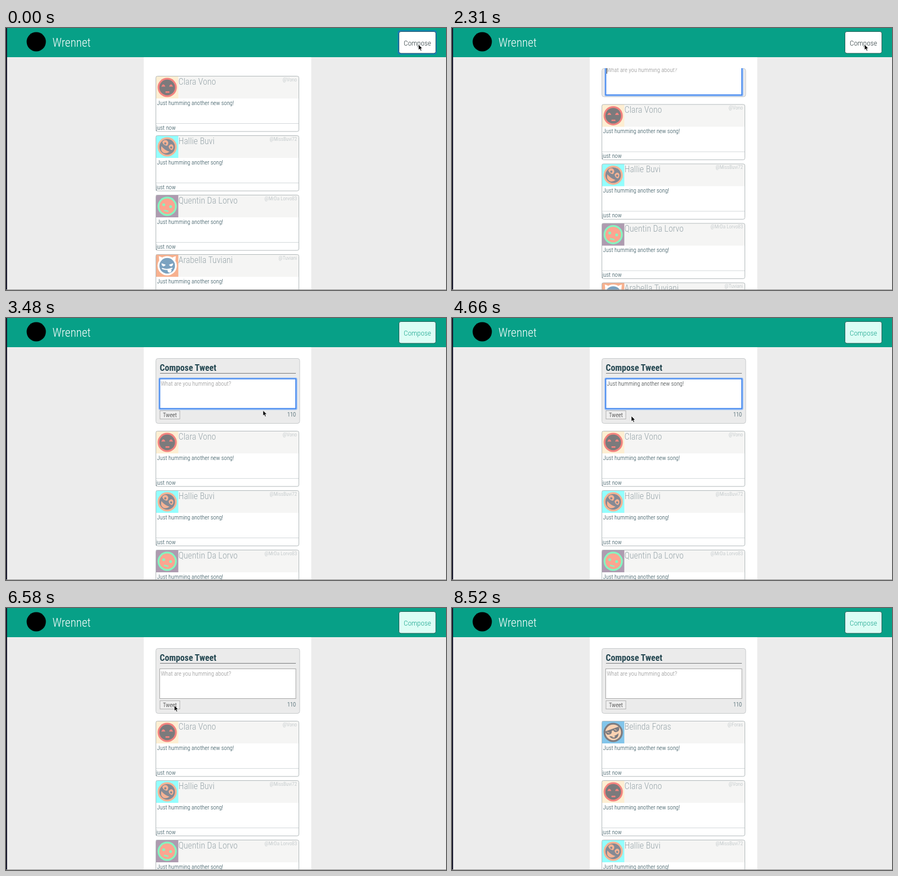
An HTML page that plays this animation: 800 by 476 pixels, repeating every 8.62 s.

```html
<!DOCTYPE html>
<html lang="en">
<head>
<meta charset="utf-8">
<title>Compose</title>
<style>
  html, body { margin: 0; width: 100%; height: 100%; overflow: hidden; background: #ececec; }
  svg { display: block; font: 300 10.8px "Roboto Condensed", Roboto, sans-serif; font-stretch: 75%; }
  text { fill: #244751; white-space: pre; }
  .name { font-size: 16.2px; fill: #99a6ab; }
  .handle { font-size: 9.45px; fill: #b3bbbe; text-anchor: end; }
  .title { font-size: 21.6px; fill: #fff; }
  .heading { font-size: 16.2px; font-weight: 700; }
  .end { text-anchor: end; }
  .mid { text-anchor: middle; }
</style>
</head>
<body>
<svg id="stage" width="800" height="476" viewBox="0 0 800 476"></svg>
<script>
const LOOP = 8620;
const PANEL_HEIGHT = 118;
const CARD_STEP = 108;
const POST_TIME = 6730;

// The screen only refreshes at these times.
const steps = [0, 2100, 2310, 2450, 2600, 2740, 2890, 3040, 3340, 3480, 3630, 3770, 4220, 4370, 4510,
  4660, 4800, 4950, 5090, 5240, 5690, 6140, 6580, 6730, 7020, 8220, 8520];

// Pointer path: time, x, y
const pointerPath = [
  [2600, 750, 30], [2740, 690, 66], [3040, 490, 160], [3340, 490, 160], [3770, 420, 184],
  [4220, 400, 184], [4660, 326, 178], [5240, 306, 177]
];

const disc = (x, y, r, fill) => `<circle cx="${x}" cy="${y}" r="${r}" fill="${fill}"/>`;
const path = (d, fill) => `<path d="${d}" fill="${fill}"/>`;
const line = (d, stroke, width) =>
  `<path d="${d}" fill="none" stroke="${stroke}" stroke-width="${width}" stroke-linecap="round"/>`;
const face = (bg, ring, skin, features) =>
  `<rect width="40.5" height="40.5" fill="${bg}"/>` +
  disc(20.3, 20.5, 17.5, ring) + disc(20.3, 20.5, 14.2, skin) + features;

const avatars = {
  shades: face('#82c5ea', '#7d7c80', '#fbd3b3',
    `<g transform="rotate(-20 20 20)">${
      path('M7 14H33V17Q32 22 27 22Q22 22 21.500 17H18.500Q18 22 13 22Q8 22 7 17Z', '#7d7c80') +
      line('M10 16.500L13 19M24 16.500L27 19', '#fbd3b3', 1)}</g>` +
    path('M13 27Q21 30 30 22Q30 31 22 32Q16 32 13 27Z', '#7d7c80') +
    path('M18 29L21 26.500L24 28L22 30Z', '#fbd3b3')),
  sleepy: face('#fdeed2', '#f3837f', '#7b7a7c',
    path('M9.500 19L12 15.200Q15.500 14.500 16.800 19ZM23.800 19Q25 14.500 28.500 15.200L31 19Z', '#f3837f') +
    '<rect x="17" y="27.600" width="7.500" height="2.600" rx="1.200" fill="#f3837f"/>'),
  grin: face('#93fefd', '#f5b294', '#858a94',
    `<g transform="rotate(35 20 20)">${
      path('M8 18Q8 11 14 11Q20 12 19 19Q13 22 8 18ZM22 18Q22 10 28 12Q32 15 31 20Q26 22 22 18Z', '#f5b294') +
      disc(14, 17, 2, '#858a94') + disc(27, 17, 2, '#858a94') +
      path('M11 25Q20 28 29 25Q26 33 20 33Q14 33 11 25Z', '#f5b294')}</g>`),
  calm: face('#ae9bb0', '#84f5c0', '#fca590',
    disc(14, 17.5, 2.6, '#84f5c0') + disc(26.5, 21, 2.6, '#84f5c0') +
    line('M15.500 28L21.500 29.500', '#84f5c0', 2.4)),
  imp: face('#f7b18f', '#fff', '#7ba2c0',
    path('M6 13L5 3Q10 4 13 7ZM35 13L36 3Q31 4 28 7Z', '#fff') +
    path('M10 16L17.500 18.500Q16 22 13 21.500Q10 20 10 16ZM31 16L23.500 18.500Q25 22 28 21.500Q31 20 31 16Z', '#fff') +
    line('M11.500 25.500Q20 29 29 25', '#fff', 2) +
    path('M21 27H28V30Q27 33 24.500 33Q22 33 21 30Z', '#fff'))
};

const hum = 'Just humming another song!';
const newHum = 'Just humming another new song!';
const posts = [
  ['Belinda Foras', '@Foras', newHum, 'shades'],
  ['Clara Vono', '@Vono', newHum, 'sleepy'],
  ['Hallie Buvi', '@MissBuvi72', hum, 'grin'],
  ['Quentin Da Lorvo', '@MrDa Lorvo83', hum, 'calm'],
  ['Arabella Tuviani', '@Tuviani', hum, 'imp']
];

const card = ([name, handle, message, avatar], i) => `
  <g id="card${i}" transform="translate(272 ${CARD_STEP * (i - 1)})">
    <rect x=".5" y=".5" width="260" height="100.500" rx="3" fill="#fff"/>
    <rect x="1" y="1" width="259.500" height="40" fill="#f5f5f4"/>
    <g transform="translate(.800 .500)">${avatars[avatar]}</g>
    <path d="M1 86.500H260" stroke="#d3d8da"/>
    <rect x=".5" y=".5" width="260" height="100.500" rx="3" fill="none" stroke="#b1b8ba"/>
    <text class="name" x="41.500" y="16">${name}</text>
    <text class="handle" x="257" y="10">${handle}</text>
    <text x="2.500" y="53">${message}</text>
    <text x="1" y="98">just now</text>
  </g>`;

const stage = document.getElementById('stage');
stage.innerHTML = `
  <defs><clipPath id="window"><rect id="windowBox" x="272" y="73" width="263" height="0"/></clipPath></defs>
  <rect width="800" height="476" fill="#ececec"/>
  <rect x="250.500" y="53" width="304.500" height="423" fill="#fff"/>
  <g id="feed">${posts.map(card).join('')}</g>
  <g id="panel">
    <rect id="panelBox" x="272.500" y="73.500" width="261.500" rx="4" fill="#ebebeb" stroke="#c6c9ca"/>
    <g clip-path="url(#window)"><g id="form">
      <text class="heading" x="279.500" y="96">Compose Tweet</text>
      <path d="M280 100.500H527" stroke="#77797b"/>
      <rect id="glow" x="279" y="110" width="249" height="55.500" rx="1.500" fill="none" stroke="#9dc1f5" stroke-width="3.500"/>
      <rect id="area" x="279.500" y="110.500" width="247.500" height="54" fill="#fff"/>
      <text id="entry" x="281.500" y="123"></text>
      <rect id="caret" y="113" width="1" height="13" fill="#333"/>
      <rect x="280" y="168.500" width="36" height="15" fill="#efefef" stroke="#b0b0b0"/>
      <text class="mid" x="298" y="180" style="fill:#222">Tweet</text>
      <text class="end" x="527" y="178.500">110</text>
    </g></g>
  </g>
  <rect width="800" height="53" fill="#07a087"/>
  <circle cx="55" cy="25" r="17.500" fill="#000"/>
  <text class="title" x="84.500" y="34">Wrennet</text>
  <rect id="ring" x="712.500" y="4.500" width="70.500" height="43.500" rx="4" fill="#1677c5"/>
  <rect id="button" x="714.500" y="6.500" width="67" height="39.500" rx="3.500" stroke="#245c55"/>
  <text id="label" class="mid" x="748" y="31.500" font-size="13.500">Compose</text>
  <rect width="2" height="476" fill="#15152a"/>
  <rect y="475" width="800" height="1" fill="#929292"/>
  <path id="pointer" d="M0 0V10L2.300 7.900L3.900 11.500L5.700 10.700L4.100 7.200H7.200Z" fill="#000" stroke="#fff" stroke-width=".8"/>`;

const el = id => document.getElementById(id);
const set = (id, attrs) => Object.entries(attrs).forEach(([key, value]) => el(id).setAttribute(key, value));
const show = (id, on) => set(id, { visibility: on ? 'inherit' : 'hidden' });
const between = (t, a, b) => t >= a && t < b;

// Tighten the spacing where no condensed face is available.
const pen = document.createElement('canvas').getContext('2d');
const measure = font => { pen.font = font; return pen.measureText(newHum).width; };
if (Math.abs(measure('300 condensed 20px "Roboto Condensed", Roboto, sans-serif') -
    measure('300 20px Roboto, sans-serif')) < 1) stage.style.letterSpacing = '-.055em';

function slide(t) {
  if (t < 2100) return 0;
  const x = Math.min(1, (t - 2053) / 560);
  return 0.5 - Math.cos(Math.PI * x) / 2;
}

function pointerAt(t) {
  const next = pointerPath.findIndex(p => p[0] > t);
  if (next === 0) return pointerPath[0].slice(1);
  if (next < 0) return pointerPath[pointerPath.length - 1].slice(1);
  const [t0, x0, y0] = pointerPath[next - 1];
  const [t1, x1, y1] = pointerPath[next];
  const k = (t - t0) / (t1 - t0);
  return [x0 + (x1 - x0) * k, y0 + (y1 - y0) * k];
}

function render(time) {
  const t = steps.filter(s => s <= time).pop();
  const p = slide(t);
  const height = PANEL_HEIGHT * p;
  const scroll = Math.min(39 + 7 * (1 - p), PANEL_HEIGHT - height);
  const posted = t >= POST_TIME;
  const focused = between(t, 2100, 6580);
  const filled = between(t, 3770, 6580);
  const hover = t < 2740;

  show('panel', p > 0);
  set('panelBox', { height });
  set('windowBox', { height: height + 0.5 });
  set('form', { transform: `translate(0 ${-scroll})` });
  set('feed', { transform: `translate(0 ${87 + height + (posted ? CARD_STEP : 0)})` });
  show('card0', posted);

  show('glow', focused);
  set('area', { stroke: focused ? '#3b82ee' : '#a5a5a5', 'stroke-width': focused ? 1.8 : 1 });
  el('entry').textContent = filled ? newHum : 'What are you humming about?';
  el('entry').style.fill = filled ? '#2f3436' : '#8b8b8b';
  const blink = filled
    ? between(t, 3770, 4220) || between(t, 4800, 5240) || between(t, 5690, 6140)
    : between(t, 2100, 2600) || between(t, 3040, 3480);
  show('caret', focused && blink);
  set('caret', { x: filled ? 422 : 281 });

  show('ring', t < 2100);
  set('button', { fill: hover ? '#fff' : '#dcfdf5' });
  el('label').style.fill = hover ? '#2b3a3d' : '#16a38c';
  show('pointer', t < 8220);
  set('pointer', { transform: `translate(${pointerAt(t)})` });
}

const start = performance.now();
function tick() {
  render((performance.now() - start) % LOOP);
  requestAnimationFrame(tick);
}
tick();
</script>
</body>
</html>
```
